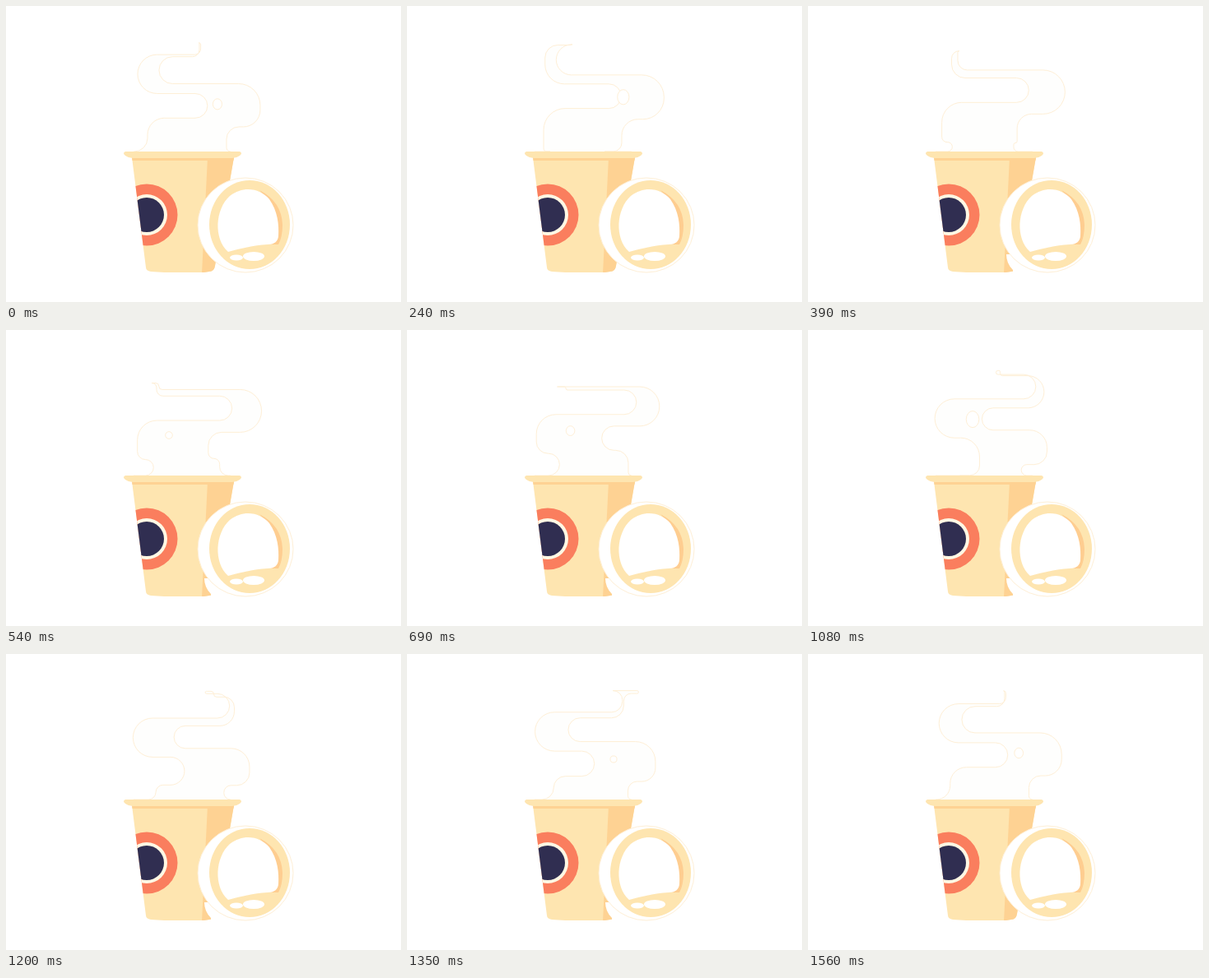
An HTML page with a canvas for the animation above (1.59 s loop, 480 by 360 pixels).

```html
<!DOCTYPE html>
<html lang="en">
<head>
<meta charset="utf-8">
<title>Steaming cup</title>
<style>
html, body { margin: 0; width: 100%; height: 100%; overflow: hidden; background: #fff; }
canvas { display: block; }
</style>
</head>
<body>
<canvas id="stage" width="480" height="360"></canvas>
<script>
const ctx = document.getElementById('stage').getContext('2d');
const LOOP = 1590, RIM = 177;
const CREAM = '#fee5b0', SHADE = '#fed293', LINE = '#feefd6';

// A fold of steam leaves the rim at `born` and climbs, shaped by `kick` and `bow`.
// The bend above it swings through four x positions between `from` and `to`.
const leftFolds = [
  { from: 240, born: 1080, to: 3420, kick: 16, bow: 0, swing: [174, 224, 280, 199] },
  { from: 1080, born: 1830, to: 4020, kick: 5, bow: 0, swing: [185, 161, 157, 205] }
];
const rightFolds = [
  { from: 240, born: 840, to: 3420, kick: 7, bow: -17, swing: [240, 300, 304, 199] },
  { from: 840, born: 1830, to: 4020, kick: 0, bow: 17, swing: [240, 258, 195, 205] }
];

function foldHeight({ born, kick, bow }, time) {
  const age = Math.max(0, time - born);
  return RIM - 0.0485 * age - kick * (1 - Math.exp(-age / 90)) - bow * Math.sin(Math.PI * age / 2600);
}

// Cubic through four evenly spaced values
function bendReach({ from, to, swing: [a, b, c, d] }, time) {
  const s = 3 * (time - from) / (to - from), s1 = s - 1, s2 = s - 2, s3 = s - 3;
  return (-a * s1 * s2 * s3 + 3 * b * s * s2 * s3 - 3 * c * s * s1 * s3 + d * s * s1 * s2) / 6;
}

function tipAt(time) {
  const turn = ms => 2 * Math.PI * (time - ms) / LOOP;
  return [
    213.5 + 36.5 * Math.cos(turn(1345)),
    53 + 12 * Math.cos(turn(690)) + 4 * Math.cos(2 * turn(690))
  ];
}

function edge(folds, baseX, time, tip) {
  const bends = [];
  for (const fold of folds) {
    for (let t = time; t < fold.to + LOOP; t += LOOP) {
      const y = foldHeight(fold, t);
      if (t >= fold.from && y > tip[1]) bends.push({ age: t - fold.from, x: bendReach(fold, t), y });
    }
  }
  bends.sort((a, b) => a.age - b.age);
  const points = [[baseX, RIM]];
  let lastX = baseX;
  for (const { x, y } of bends) {
    if (y < RIM) points.push([lastX, y], [x, y]);
    else points[1] = [x, RIM];
    lastX = x;
  }
  points.push([lastX, tip[1]], tip);
  return points;
}

function roundedLine(points) {
  const last = points.length - 1;
  const reach = i => Math.hypot(points[i + 1][0] - points[i][0], points[i + 1][1] - points[i][1]) *
    (i === 0 || i === last - 1 ? 0.95 : 0.5);
  ctx.lineTo(...points[0]);
  for (let i = 1; i < last; i++) {
    ctx.arcTo(...points[i], ...points[i + 1], Math.min(reach(i - 1), reach(i)));
  }
  ctx.lineTo(...points[last]);
}

function paint(color, path) {
  ctx.fillStyle = color;
  ctx.fill(new Path2D(path));
}

function ellipse(color, x, y, rx, ry = rx, line) {
  ctx.beginPath();
  ctx.ellipse(x, y, rx, ry, 0, 0, Math.PI * 2);
  ctx.fillStyle = color;
  ctx.fill();
  if (line) {
    ctx.strokeStyle = line;
    ctx.stroke();
  }
}

function bubble(time, born, x, drift, size) {
  const age = ((time - born + 130 + LOOP) % LOOP - 130) / 265;
  if (age < 2.25) {
    ellipse('#fff', x + drift * age, 128 - 9.5 * age, size + 1.7 * age, size + 2.8 * age, LINE);
  }
}

function drawSteam(time) {
  const tip = tipAt(time);
  ctx.beginPath();
  roundedLine(edge(leftFolds, 155, time, tip));
  roundedLine(edge(rightFolds, 273, time, tip).reverse());
  ctx.fillStyle = '#fefefd';
  ctx.strokeStyle = LINE;
  ctx.fill();
  ctx.stroke();
  bubble(time, 540, 198, 1, 4.3);
  bubble(time, 1350, 251, 6.5, 4);
}

function drawCup(time) {
  const body = 'M153 184H277L254 316Q253 323 247 323L240 324H192L176 323Q170 322 170 318Z';
  paint(CREAM, body);
  ctx.save();
  ctx.clip(new Path2D(body));
  paint(SHADE, 'M245 184H280V325H238Z');
  paint(SHADE, 'M150 184H280V188H150Z');
  ellipse('#fa7e5e', 171, 254, 37.5);
  ellipse('#fff8e4', 171, 254, 25);
  ellipse('#302e51', 171, 254, 21);
  ctx.restore();
  paint(CREAM, 'M145 177H284Q288 179 284 182Q280 185 275 185H154Q149 185 145 182Q141 179 145 177Z');
  if (time > 390 && time < 1480) paint('#fff', 'M241 302Q241 313 249 321V325H262V302Z');
}

function drawLid() {
  ellipse('#fff', 291, 266.5, 58, 57.5, LINE);
  ellipse(CREAM, 296, 266, 49, 54);
  paint('#fecd90', 'M308 224Q335 238 336 266Q336 281 331 290L322 290V240Z');
  paint('#fff', 'M270 299C252 283 254 247 272 231C289 218 309 222 320 235' +
    'C330 249 332 266 331 280Q330 290 318 290C300 291 285 295 270 299Z');
  ellipse('#fff', 280, 306, 8, 3.5);
  ellipse('#fff', 301, 304.5, 13, 5.5);
}

function draw() {
  const time = performance.now() % LOOP;
  ctx.fillStyle = '#fff';
  ctx.fillRect(0, 0, 480, 360);
  drawSteam(time);
  drawCup(time);
  drawLid();
  requestAnimationFrame(draw);
}
draw();
</script>
</body>
</html>
```
